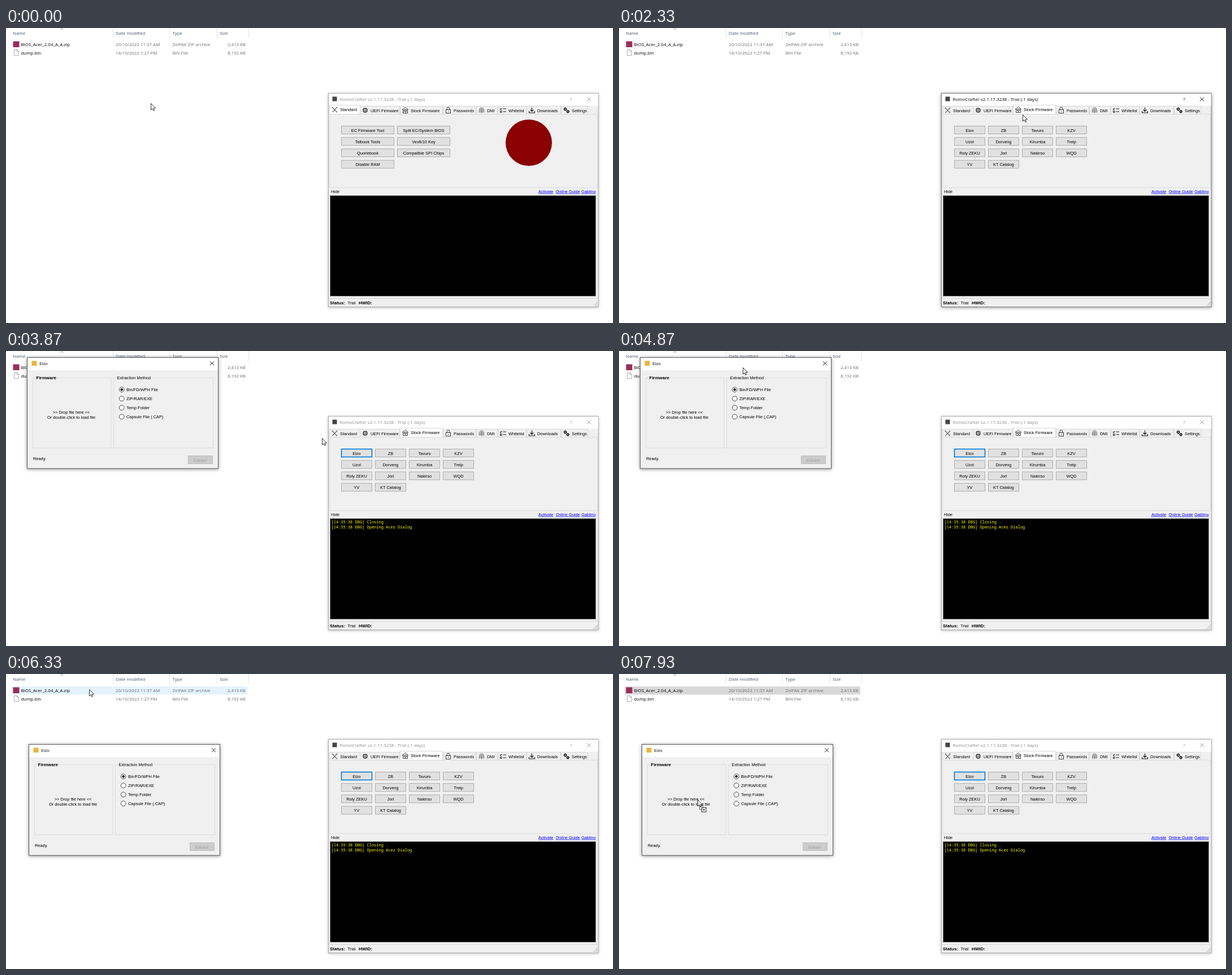
Write an HTML page that moves like this. It is 1074 px wide and 522 px high and loops after 8000 ms.

```html
<!DOCTYPE html>
<html lang="en">
<head>
<meta charset="utf-8">
<title>Firmware tool walkthrough</title>
<style>
  html, body { margin: 0; width: 100%; height: 100%; overflow: hidden; background: #fff; }
  svg { display: block; width: 1074px; height: 522px; }
  text { white-space: pre; }
  .ui { font: 7.9px "Open Sans", "Noto Sans", sans-serif; }
  .form { font: 7.4px "Liberation Sans", Arial, sans-serif; }
  .bold { font: bold 8px "Liberation Sans", Arial, sans-serif; }
  .log { font: 7px "Noto Sans Mono", "Liberation Mono", monospace; }
  .link { text-decoration: underline; }
  .shadow { filter: drop-shadow(0 1px 3px #0006); }
  .soft { filter: drop-shadow(0 1px 2.5px #0004); }
</style>
</head>
<body>
<svg id="stage" viewBox="0 0 1074 522"></svg>
<script>
const STEP = 1000 / 15, STEPS = 120;
const stage = document.getElementById('stage');

// Shape helpers
const text = (x, middle, str, { cls = 'form', fill = '#000', anchor = 'start' } = {}) =>
  `<text class="${cls}" x="${x}" y="${middle + 2.7}" fill="${fill}" text-anchor="${anchor}">${str}</text>`;
const rect = (x, y, w, h, fill, stroke = 'none', weight = 1) =>
  `<rect x="${x}" y="${y}" width="${w}" height="${h}" fill="${fill}" stroke="${stroke}" stroke-width="${weight}"/>`;
const line = (d, stroke = '#000', weight = 1, fill = 'none') =>
  `<path d="${d}" fill="${fill}" stroke="${stroke}" stroke-width="${weight}"/>`;
const circle = (x, y, r, fill, stroke = 'none', weight = 1) =>
  `<circle cx="${x}" cy="${y}" r="${r}" fill="${fill}" stroke="${stroke}" stroke-width="${weight}"/>`;
const at = (x, y, content, cls = '') => `<g class="${cls}" transform="translate(${x} ${y})">${content}</g>`;
const cross = (x, y, color) => line(`M${x - 3.5} ${y - 3.5}l7 7m0-7l-7 7`, color, 0.9);

// Pointer path: [step, x, y, upward bend]
const path = [
  [7, 256, 133], [17, 756, 135, 27], [19, 756, 135], [21, 756, 141], [32, 756, 141],
  [40, 622, 179], [44, 622, 179], [46, 622, 176], [55, 622, 176], [67, 221, 32],
  [70, 218, 19], [72, 218, 19], [73, 219, 29], [79, 221, 130], [80, 221, 132],
  [83, 221, 132], [95, 147, 27], [96, 155, 26], [98, 167, 26], [102, 167, 26],
  [109, 161, 26], [111, 161, 26], [119, 139, 222]
];

function pointerAt(step) {
  const i = path.findIndex(key => key[0] >= step);
  if (i === 0) return path[0].slice(1, 3);
  const [s0, x0, y0] = path[i - 1], [s1, x1, y1, bend = 0] = path[i];
  const p = (step - s0) / (s1 - s0), ease = p * p * (3 - 2 * p);
  return [x0 + (x1 - x0) * ease, y0 + (y1 - y0) * ease - bend * Math.sin(Math.PI * ease)];
}

function explorer(rowFill) {
  const head = (x, str) => text(x, 9, str, { cls: 'ui', fill: '#44546a' });
  const row = (y, cells) => {
    const [name, date, type, size] = cells, meta = { cls: 'ui', fill: '#6d6d6d' };
    return text(26.5, y, name, { cls: 'ui' }) + text(194, y, date, meta) + text(294.5, y, type, meta) +
      text(424, y, size, { ...meta, anchor: 'end' });
  };
  return rect(10, 22, 417, 14.5, rowFill) +
    [189.5, 289.5, 373.5, 429.5].map(x => line(`M${x} 0V18`, '#e3e3e3')).join('') +
    line('M96 3l2.7-2.5 2.7 2.5', '#777', 0.8) +
    head(12, 'Name') + head(194, 'Date modified') + head(294.5, 'Type') + head(378, 'Size') +
    rect(12.5, 23.5, 11, 10.5, '#9b2d5a') +
    line('M14.5 38.5h5l2.8 2.8v7.4h-7.8zM19.5 38.5v2.8h2.8', '#888', 0.7, '#fff') +
    row(29, ['BIOS_Acer_2.04_A_A.zip', '20/10/2022 11:37 AM', 'ZelPAK ZIP archive', '2,413 KB']) +
    row(44, ['dump.bin', '14/10/2022 1:27 PM', 'BIN File', '8,192 KB']);
}

// Tab icons, centred on the origin
const gear = (x, y, r) => circle(x, y, r, 'none', '#111', 1.4) +
  `<circle cx="${x}" cy="${y}" r="${r + 0.9}" fill="none" stroke="#111" stroke-width="1" stroke-dasharray="1 1"/>`;
const icons = {
  tools: line('M-4.5-4.5L4 4.5M4.5-4.5L-4 4.5', '#777', 1.4) + line('M-5-3l2-2M3-5l2 2M3 5l2-2', '#555', 0.8),
  chip: rect(-2.8, -2.8, 5.6, 5.6, 'none', '#222', 1.2) + rect(-1, -1, 2, 2, '#333') +
    line('M-1.6-4.6v1.8m1.6-1.8v1.8m1.6-1.8v1.8M-1.6 2.8v1.8m1.6-1.8v1.8m1.6-1.8v1.8M-4.6-1.6h1.8m-1.8 1.6h1.8m-1.8 1.6h1.8M2.8-1.6h1.8m-1.8 1.6h1.8m-1.8 1.6h1.8', '#333', 0.7),
  house: line('M-5.5-.5L0-5 5.5-.5M-4-1.5V5H4V-1.5', '#222', 0.9) + rect(-1.6, -1, 3.2, 3.2, 'none', '#222', 0.9) +
    line('M-3 .5h1.4M1.6.5H3M0 2.2V4', '#333', 0.8),
  lock: rect(-4, -1, 8, 6, '#fff', '#222', 0.9) + line('M-2.4-1v-2a2.4 2.4 0 0 1 4.8 0v2M0 1v2', '#222', 0.9),
  print: [1.3, 2.8, 4.3].map(r => line(`M${-r} 4V0a${r} ${r + 0.5} 0 0 1 ${2 * r} 0v4`, '#555', 0.7)).join('') + line('M0-1V5', '#555', 0.7),
  list: line('M-5.5-2.5l1.3 1.3 2-2.5M0-2.5h5.5M0 2.5h5.5', '#111', 1.1) + rect(-5, 1.2, 2.6, 2.6, 'none', '#111', 0.9),
  down: line('M0-5V2M-3-1l3 3 3-3M-5 1.5v3H5v-3', '#111', 1.1),
  gears: gear(-2, -2, 1.8) + gear(2.6, 2.4, 1.6)
};

// [left, right, label, icon]
const tabs = [
  [572, 627, 'Standard', 'tools'], [626, 697, 'UEFI Firmware', 'chip'], [697, 773, 'Stock Firmware', 'house'],
  [773, 832, 'Passwords', 'lock'], [832, 870, 'DMI', 'print'], [870, 921, 'Whitelist', 'list'],
  [921, 982, 'Downloads', 'down'], [982, 1030, 'Settings', 'gears']
];

function tabStrip(selected, hovered) {
  const tab = ([left, right, label, icon], i) => {
    const on = i === selected, top = on ? 136.5 : 138.5;
    const fill = on ? '#fff' : i === hovered ? '#d8eaf9' : '#f0f0f0';
    return rect(left + 0.5, top, right - left - 1, 152.5 - top, fill, '#d9d9d9') +
      at(left + 9.5, on ? 144.5 : 145.5, icons[icon]) + text(left + 19, on ? 144.5 : 145.8, label);
  };
  const all = tabs.map(tab);
  return rect(572.5, 152.5, 474, 130, '#f0f0f0', '#dedede') + all.join('') + all[selected];
}

const buttonLooks = {
  normal: ['#e1e1e1', '#adadad', 1], hover: ['#e5f1fb', '#0078d7', 1],
  pressed: ['#cce4f7', '#005499', 1], focus: ['#e1e1e1', '#0078d7', 1.6]
};
const button = (x, y, w, label, look = 'normal') => {
  const [fill, stroke, weight] = buttonLooks[look];
  return rect(x + 0.5, y + 0.5, w - 1, 14, fill, stroke, weight) +
    text(x + w / 2, y + 7.8, label, { anchor: 'middle' });
};
const buttonGrid = (labels, columns, w, pitch, firstLook) => labels.map((label, i) =>
  button(593 + (i % columns) * pitch, 173 + Math.floor(i / columns) * 20.2, w, label, i ? 'normal' : firstLook)).join('');

const tools = ['EC Firmware Tool', 'Split EC/System BIOS', 'Talbook Tools', 'Vex8/10 Key',
  'Quorlebook', 'Compatible SPI Chips', 'Disable RAM'];
const makers = ['Elzo', 'ZB', 'Tavuro', 'KZV', 'Uzol', 'Dorveng', 'Kirumba', 'Trelp',
  'Roly ZEKU', 'Jorl', 'Nakirso', 'WQD', 'YV', 'KT Catalog'];

function mainWindow({ active, stock, tabHover, look, logged }) {
  const ink = active ? '#000' : '#8a8a8a';
  const link = (x, label, anchor) => text(x, 289, label, { cls: 'form link', fill: '#00f', anchor });
  const logLine = (y, str) => text(575.5, y, str, { cls: 'log', fill: '#ff0' });
  let grip = '';
  for (let r = 0; r < 3; r++)
    for (let c = 2 - r; c < 3; c++) grip += rect(1039.5 + c * 2.6, 485 + r * 2.6, 1.4, 1.4, '#aaa');
  return `<g class="${active ? 'shadow' : 'soft'}">${rect(570.5, 115.5, 477.5, 378, '#f0f0f0', active ? '#777' : '#aaa')}</g>` +
    rect(571, 116, 476.5, 21.5, '#fff') + rect(577.5, 121.5, 8, 8, '#444') +
    text(590.5, 126.3, 'RomoCrafter v2.1.17.3238 - Trial (-1 days)', { cls: 'ui', fill: ink }) +
    text(1000, 126.3, '?', { cls: 'ui', fill: ink, anchor: 'middle' }) + cross(1031.5, 126, ink) +
    tabStrip(stock ? 2 : 0, tabHover ? 2 : -1) +
    (stock ? buttonGrid(makers, 4, 55, 60, look)
      : buttonGrid(tools, 2, 94, 99, 'normal') + circle(925, 203, 41, '#8b0000')) +
    text(575, 289, 'Hide') + link(942, 'Activate') + link(972.5, 'Online Guide') + link(1043.5, 'Gablino', 'end') +
    rect(573.5, 296.5, 470, 178, '#000', '#8a8f8a') +
    (logged ? logLine(302.5, '[14:35:38 DBG] Closing .') + logLine(311.5, '[14:35:38 DBG] Opening Acer Dialog') : '') +
    line('M571 478.5H1047', '#d7d7d7') + text(573, 486.5, 'Status:', { cls: 'bold' }) +
    text(604.5, 486.5, 'Trial') + text(624, 486.5, 'HWID:', { cls: 'bold' }) + grip;
}

const tooltip = opacity => `<g opacity="${opacity}">` + rect(624, 194, 363, 14, '#0005') +
  rect(622.5, 192.5, 362, 13.5, '#fff', '#767676') +
  text(626, 199.3, 'Extract and split  Bios update from Elzo or any Orvyne K20 file into System Bios and EC firmware.',
    { cls: 'ui', fill: '#575757' }) + '</g>';

// Extraction dialog, drawn from its own top left corner
const radios = ['Bin/FD/WPH File', 'ZIP/RAR/EXE', 'Temp Folder', 'Capsule File (.CAP)'];
const group = (x, w, legendWidth, legend, cls) => rect(x, 36.5, w, 124, 'none', '#dcdcdc') +
  rect(x + 5, 35, legendWidth, 3, '#f0f0f0') + text(x + 6, 36.7, legend, { cls });
const dialog =
  `<g class="shadow">${rect(0.5, 0.5, 338, 196.5, '#f0f0f0', '#555')}</g>` + rect(1, 1, 337, 22, '#fff') +
  rect(8.5, 6.5, 9, 8.5, '#e9b53a') + text(22, 11.2, 'Elzo', { cls: 'ui' }) + cross(327.5, 10.8, '#000') +
  group(10.5, 138.5, 36, 'Firmware', 'bold') + group(153.5, 176, 62, 'Extraction Method', 'form') +
  text(78.5, 97, '&gt;&gt; Drop file here &lt;&lt;', { anchor: 'middle' }) +
  text(78.5, 106, 'Or double-click to load file', { anchor: 'middle' }) +
  radios.map((label, i) => circle(167.7, 57.3 + i * 16, 4.4, '#fff', '#333', 0.9) +
    (i ? '' : circle(167.7, 57.3, 2.4, '#222')) + text(176, 57.6 + i * 16, label)).join('') +
  text(11, 179, 'Ready.') + rect(285.5, 174.5, 43, 14, '#ccc', '#bfbfbf') +
  text(306.5, 182.3, 'Extract', { fill: '#a0a0a0', anchor: 'middle' });

const arrow = line('M.5.5V12L3.1 9.6 4.8 13.4 6.6 12.6 5 8.9H8.5Z', '#000', 0.8, '#fff');
const copyBadge = rect(3.5, 11.5, 6, 6, 'none', '#444', 0.8) + rect(7.5, 14.5, 7.5, 7.5, '#fff', '#111', 0.9) +
  line('M11.2 16.2v4M9.2 18.2h4', '#111', 0.9);

function render(step) {
  const [x, y] = pointerAt(step);
  const dragging = step >= 112;
  const rowHover = step > 84 && y >= 22 && y < 37;
  const look = step >= 55 ? 'focus' : step >= 53 ? 'pressed' : step >= 33 && x < 648 && y > 172 ? 'hover' : 'normal';
  // The dialog trails the pointer by one step while it is dragged.
  const [holdX, holdY] = pointerAt(Math.min(Math.max(step - 1, 70), 82));

  stage.innerHTML = explorer(dragging ? '#d9d9d9' : rowHover ? '#e5f3ff' : 'none') +
    mainWindow({
      active: step >= 24 && step < 55, stock: step >= 24, tabHover: step >= 20, look, logged: step >= 55
    }) +
    (step > 44 && step < 53 ? tooltip(Math.min(1, (step - 44) / 3)) : '') +
    (step >= 55 ? at(Math.round(holdX) - 181, Math.round(holdY) - 8, dialog) : '') +
    at(Math.round(x), Math.round(y), arrow + (dragging ? copyBadge : ''));
}

let shown = -1;
function tick() {
  // A few milliseconds of lead keep each change on the rounded step time.
  const step = Math.floor((performance.now() + 4) / STEP) % STEPS;
  if (step !== shown) render(shown = step);
  requestAnimationFrame(tick);
}
tick();
</script>
</body>
</html>
```
